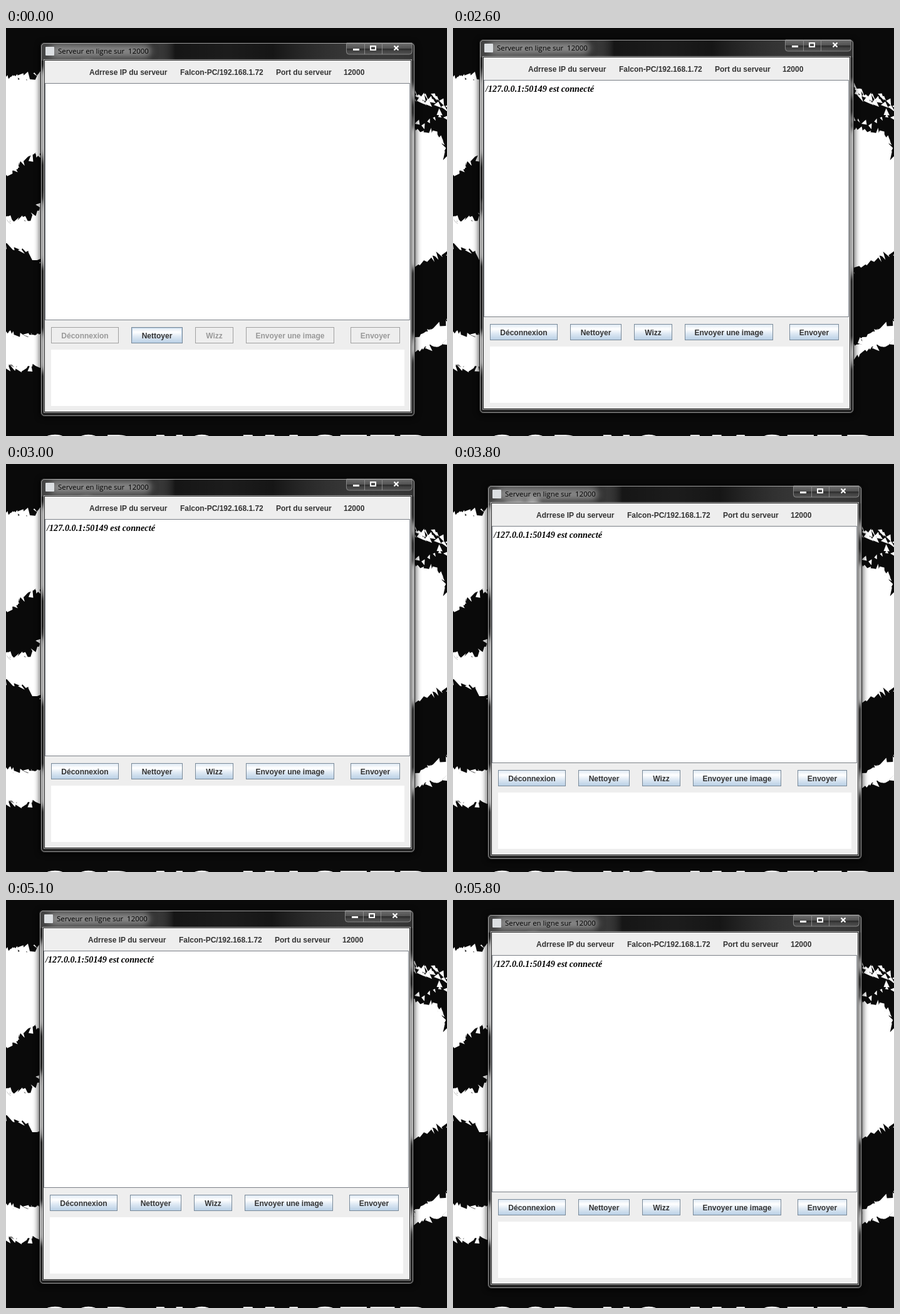
Animation of 704x652 px, one loop 6 s. Source, as an HTML page:

```html
<!DOCTYPE html>
<html lang="fr">
<head>
<meta charset="utf-8">
<title>Serveur en ligne</title>
<style>
html, body { margin: 0; width: 100%; height: 100%; overflow: hidden; background: #0a0a0a; }
svg { display: block; width: 704px; height: 652px; }
text { white-space: pre; }
.ui { font: bold 12px "Liberation Sans", Arial, sans-serif; fill: #333; }
.title { font: 11.45px "Open Sans", "Noto Sans", sans-serif; fill: #000; }
.log { font: italic bold 14.25px "Liberation Serif", "Times New Roman", serif; fill: #000; }
.slogan { font: bold 69px "Liberation Sans", Arial, sans-serif; fill: #fff; stroke: #fff; stroke-width: 1.5; }
</style>
</head>
<body>
<svg viewBox="0 0 704 652">
  <defs>
    <linearGradient id="ocean" x2="0" y2="1">
      <stop stop-color="#dde8f3"/>
      <stop offset=".3" stop-color="#fff"/>
      <stop offset=".6" stop-color="#dde8f3"/>
      <stop offset="1" stop-color="#b8cfe5"/>
    </linearGradient>
    <linearGradient id="glass">
      <stop stop-color="#fff" stop-opacity=".16"/>
      <stop offset=".3" stop-color="#fff" stop-opacity=".06"/>
      <stop offset=".36" stop-color="#000" stop-opacity=".35"/>
      <stop offset=".5" stop-color="#000" stop-opacity=".15"/>
      <stop offset=".62" stop-color="#000" stop-opacity=".35"/>
      <stop offset="1" stop-color="#fff" stop-opacity=".08"/>
    </linearGradient>
    <linearGradient id="control" x2="0" y2="1">
      <stop stop-color="#fff" stop-opacity=".28"/>
      <stop offset=".48" stop-color="#fff" stop-opacity=".14"/>
      <stop offset=".5" stop-color="#000" stop-opacity=".3"/>
      <stop offset="1" stop-color="#fff" stop-opacity=".1"/>
    </linearGradient>
    <filter id="soft" x="-10%" y="-10%" width="120%" height="120%"><feGaussianBlur stdDeviation="4"/></filter>
    <filter id="glow" x="-20%" y="-100%" width="140%" height="300%"><feGaussianBlur stdDeviation="6"/></filter>
    <clipPath id="frame"><rect x="55" y="23" width="598" height="598" rx="6"/></clipPath>
  </defs>

  <g id="wall">
    <rect x="-60" y="-60" width="824" height="772" fill="#0a0a0a"/>
    <g id="paint" fill="#fff"></g>
    <g class="slogan">
      <text x="8" y="698" text-anchor="end">NO</text>
      <text x="51" y="698">GOD</text>
      <text x="236" y="698">NO</text>
      <text x="375" y="698" textLength="0" letter-spacing="1.8">MASTER</text>
    </g>
  </g>

  <g id="win">
    <rect x="53" y="23" width="602" height="601" rx="7" opacity=".6" filter="url(#soft)"/>
    <g clip-path="url(#frame)">
      <use id="behind" href="#wall" filter="url(#soft)"/>
      <rect x="55" y="23" width="598" height="598" fill="#3a3a3a" opacity=".45"/>
      <rect x="55" y="23" width="598" height="29" fill="url(#glass)"/>
      <rect x="70" y="27" width="162" height="20" rx="9" fill="#bbb" opacity=".62" filter="url(#glow)"/>
    </g>
    <rect x="55.5" y="23.5" width="597" height="597" rx="6" fill="none" stroke="#111"/>
    <rect x="56.5" y="24.5" width="595" height="595" rx="5" fill="none" stroke="#fff" stroke-opacity=".55"/>

    <rect x="63" y="30" width="14" height="14" rx="1" fill="#dcdfe2"/>
    <text class="title" x="83" y="41">Serveur en ligne sur  12000</text>

    <path d="M543.5 24V38q0 4 4 4H644q4 0 4-4V24z" fill="url(#control)" stroke="#999" stroke-opacity=".8"/>
    <path d="M572.5 24V42M600.5 24V42" stroke="#999" stroke-opacity=".8"/>
    <path d="M554 33h10v3h-10z" fill="#fff"/>
    <rect x="582" y="29" width="8" height="6" fill="none" stroke="#fff" stroke-width="2"/>
    <path d="M619.5 28.500l7 7m0-7l-7 7" stroke="#fff" stroke-width="2.2"/>

    <g shape-rendering="crispEdges">
      <rect x="60.5" y="50.500" width="587" height="564" fill="none" stroke="#fff" stroke-opacity=".6"/>
      <rect x="61.5" y="51.5" width="585" height="562" fill="#eee" stroke="#222"/>
      <rect x="62.5" y="88.5" width="582" height="378" fill="#fff" stroke="#7a7f86"/>
      <rect x="72" y="514" width="564" height="90" fill="#fff"/>
    </g>
    <g class="ui">
      <text x="133" y="75">Adrrese IP du serveur</text>
      <text x="278" y="75">Falcon-PC/192.168.1.72</text>
      <text x="431" y="75">Port du serveur</text>
      <text x="539" y="75">12000</text>
    </g>
    <text id="log" class="log" x="65" y="107">/127.0.0.1:50149 est connecté</text>
    <g id="buttons" class="ui" text-anchor="middle"></g>
  </g>
</svg>
<script>
const LOOP = 6000, STEP = 100;
const $ = id => document.getElementById(id);

function add(parent, tag, attrs, text) {
  const el = document.createElementNS('http://www.w3.org/2000/svg', tag);
  for (const k in attrs) el.setAttribute(k, attrs[k]);
  if (text) el.textContent = text;
  parent.appendChild(el);
  return el;
}

let seed = 11;
const rnd = () => (seed = seed * 16807 % 2147483647) / 2147483647;
const spread = a => (rnd() - .5) * 2 * a;

// Torn outline through a few corner points, with shards along it
function torn(corners, amp) {
  const pts = [];
  corners.forEach(([x, y], i) => {
    const [u, v] = corners[(i + 1) % corners.length];
    const n = Math.ceil(Math.hypot(u - x, v - y) / 5);
    for (let k = 0; k < n; k++) {
      const px = x + (u - x) * k / n, py = y + (v - y) * k / n;
      pts.push([px + spread(amp * .6), py + spread(amp)]);
      if (rnd() < .3) shard(px, py, amp * 1.4);
    }
  });
  add($('paint'), 'polygon', { points: pts.map(p => p.map(c => c.toFixed(1))).join(' ') });
}

function shard(x, y, size, fill = '#fff') {
  const dx = size * (.4 + rnd() * .6), dy = size * (.3 + rnd() * .6);
  const p = [x - dx, y - dy * spread(1), x + dx * .7, y + dy, x + spread(3), y - dy];
  add($('paint'), 'polygon', { points: p.map(c => c.toFixed(1)).join(' '), fill });
}

torn([[-20, 83], [20, 82], [57, 72], [130, 62], [130, 200], [57, 203], [32, 207], [12, 226], [-20, 246]], 7);
torn([[-20, 308], [36, 306], [57, 286], [85, 262], [130, 400], [57, 371], [30, 358], [-20, 345]], 7);
torn([[-20, 491], [20, 489], [57, 494], [110, 500], [110, 550], [57, 538], [30, 545], [-20, 539]], 6);
torn([[600, 163], [655, 164], [682, 167], [697, 180], [701, 206], [730, 212], [730, 354], [690, 362], [655, 381], [600, 405]], 6);
torn([[600, 555], [655, 520], [680, 508], [730, 493], [730, 455], [690, 475], [665, 494], [600, 527]], 6);
for (let i = 0; i < 26; i++) {
  const x = 630 + i * 3;
  shard(x, 98 + (x - 640) * .5 + spread(11), 8);
  if (i % 3 == 0) shard(x, 148 + spread(9), 6);
}
shard(9, 540, 7, '#777');

// label, x, width, time at which it becomes enabled
const buttons = [
  ['Déconnexion', 72, 108, 1200],
  ['Nettoyer', 200, 82, 0],
  ['Wizz', 302, 61, 900],
  ['Envoyer une image', 383, 141, 900],
  ['Envoyer', 550, 79, 900]
].map(([label, x, w, on]) => ({
  on,
  box: add($('buttons'), 'rect', { x: x + .5, y: 478.5, width: w - 1, height: 25, 'shape-rendering': 'crispEdges' }),
  text: add($('buttons'), 'text', { x: x + w / 2, y: 496 }, label)
}));
const hover = add($('buttons'), 'rect', {
  x: 201.5, y: 479.5, width: 79, height: 23, fill: 'none', stroke: '#b8cfe5', 'shape-rendering': 'crispEdges'
});

// Each burst moves the window once per step, then it returns to rest
const bursts = [
  [2600, [[-13, -5], [-30, 8], [-7, 17], [3, -7]]],
  [3600, [[8, -7], [-12, 16], [0, 11], [-10, 28], [14, 6], [4, -3]]],
  [5100, [[-2, -7], [-27, -14], [14, -22], [-9, -4], [10, -11], [-16, -2]]]
];

function offset(t) {
  for (const [start, moves] of bursts) {
    const move = moves[Math.floor((t - start) / STEP)];
    if (move) return move;
  }
  return [0, 0];
}

function draw(t) {
  const [dx, dy] = offset(t);
  $('win').setAttribute('transform', `translate(${dx} ${dy})`);
  $('behind').setAttribute('transform', `translate(${-dx} ${-dy})`);
  const linked = t >= 1200;
  $('log').style.display = linked ? '' : 'none';
  hover.style.display = linked ? 'none' : '';
  for (const b of buttons) {
    const on = t >= b.on;
    b.box.setAttribute('fill', on ? 'url(#ocean)' : '#eee');
    b.box.setAttribute('stroke', on ? '#7a8a99' : '#a0a0a0');
    b.text.style.fill = on ? '#333' : '#999';
  }
}

function tick() {
  draw(performance.now() % LOOP);
  requestAnimationFrame(tick);
}
tick();
</script>
</body>
</html>
```
